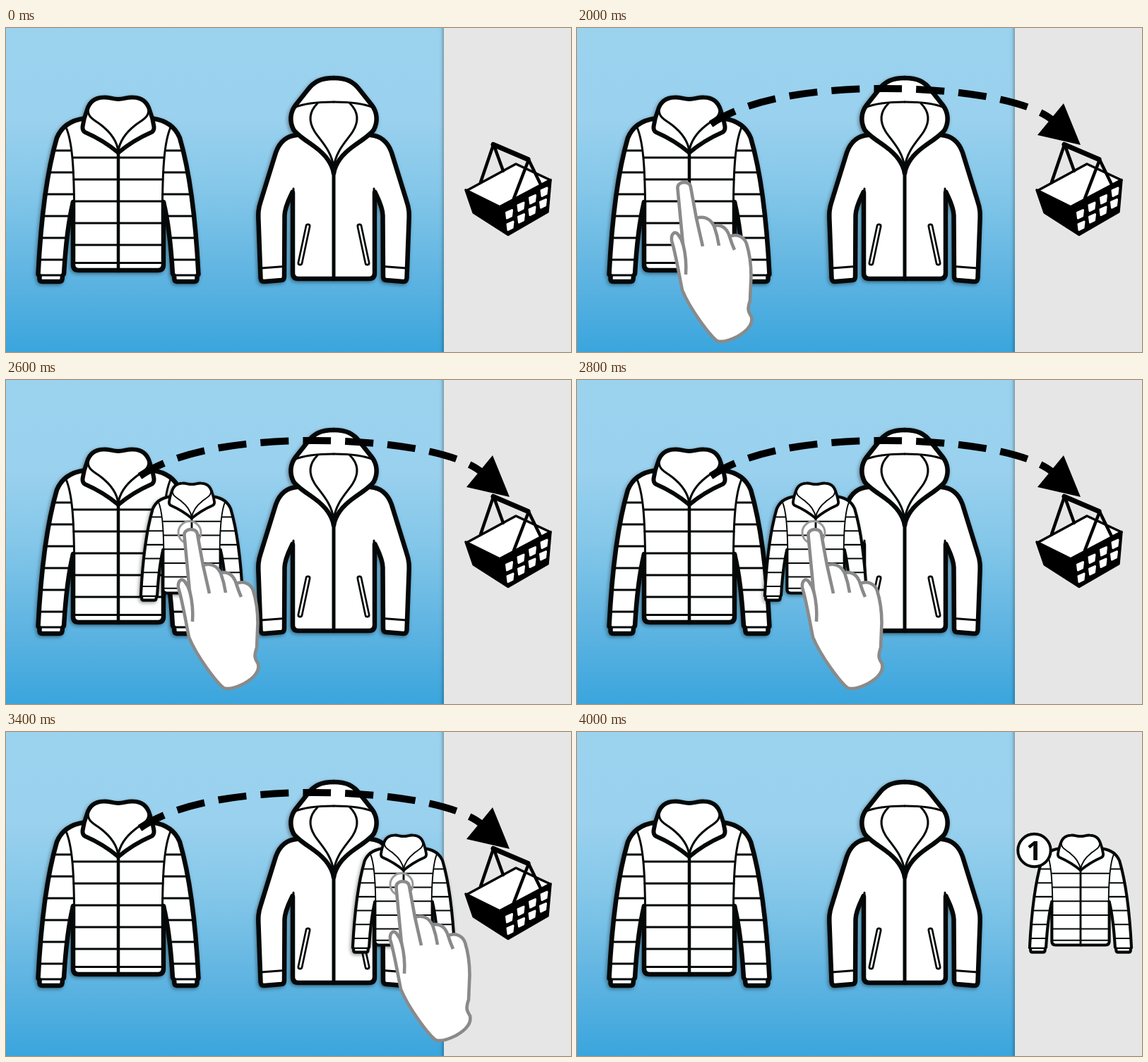
Recreate the animation shown at these times as an HTML page with a canvas. Size 800 px wide and 460 px high, loop 6 s.

```html
<!DOCTYPE html>
<html lang="en">
<head>
<meta charset="utf-8">
<title>Drag to basket</title>
<style>
  html, body { margin: 0; width: 100%; height: 100%; overflow: hidden; background: #e6e6e6; }
  canvas { display: block; width: 100%; height: 100%; }
</style>
</head>
<body>
<canvas id="stage" width="800" height="460"></canvas>
<script>
const W = 800, H = 460, LOOP = 6000, STEP = 100;
const INK = '#050808', GREY = '#8a8a8a';
const canvas = document.getElementById('stage');
const ctx = canvas.getContext('2d');
const layer = document.createElement('canvas');
layer.width = W;
layer.height = H;
const lctx = layer.getContext('2d');

const path = d => new Path2D(d);

// Garments are described by their left half only.
const pufferSleeve = 'M110 128.5C93 131 79 139 72 156C62 190 50.5 250 45.5 350L47.5 352V357Q48 360 51 360H76Q79 360 79.5 357L80 352L82 349C84 315 87 280 95 247';
const pufferCollar = '159 101C150 101 147 98 138 98.5C123 99 117 108 114.5 117C111 126 109.5 133 108.5 140Q108 146 112 148C128 155 146 166 159 177';
const puffer = {
  axis: 159,
  fills: [
    path(pufferSleeve + 'L100 140Z'),
    path('M161 344H103Q95 344 95 336V245L85 142L110 129L161 120Z')
  ],
  lines: [
    [6.5, path(pufferSleeve)],
    [6.5, path('M159 344H103Q95 344 95 336V248')],
    [3, path('M85 141C94 162 96 200 96.5 247')],
    [3.2, path('M68 174H91M62 205H95M55 236H96M51 267H90M49 298H86M46 329H84M46 351H81')],
    [3.2, path('M95 184H159M96 215H159M96 246H159M95 277H159M95 308H159M95 333.5H159')]
  ],
  topFill: path('M161 101H' + pufferCollar + 'H161Z'),
  topLines: [
    [6, path('M' + pufferCollar)],
    [3, path('M117 110C113 126 123 129 135 138C149 149 157 160 159 175')]
  ],
  zip: [4.5, 177, 344]
};
puffer.topFill = path('M161 101L' + pufferCollar + 'H161Z');

const hoodieSleeve = 'M412 152C398 153 388 160 382 177L361 245C357 257 357 263 357.5 274L360.5 355Q361 360.5 366 360L390 358Q394 357.5 394 353L394.5 266C395 253 401 243 405.5 233';
const hood = '464 71C446 71 436 76 427 88L410 109.5C402 120 401.5 133 407 144C412 152 424 159 437 168.5C450 178 461 190 464 206';
const pocket = path('M427.5 281.5L416.5 333.5');
const hoodie = {
  axis: 464,
  fills: [
    path(hoodieSleeve + 'L420 150Z'),
    path('M466 356H414Q406 356 406 348V228L398 160L466 130Z')
  ],
  lines: [
    [6.5, path(hoodieSleeve)],
    [6.5, path('M464 356H414Q406 356 406 348V234')],
    [3, path('M407 228V240')],
    [3, path('M361 341L394 338.5')],
    [8, pocket]
  ],
  slit: pocket,
  topFill: path('M466 71L' + hood + 'H466Z'),
  topLines: [
    [6.5, path('M' + hood)],
    [3, path('M408 113C422 107 442 105 464 105')],
    [3, path('M441 107C428 120 429 134 437 147C446 161 461 174 464 198')]
  ],
  zip: [5, 196, 356]
};

const arrowPath = path('M189.5 136.5C252 94 360 86 436 86C530 86 640 100 676 133');
const arrowHead = path('M713 166L689 107L652 152Z');
const handShape = path('M177.5 221C176 210 195 209 196 219L204 263C213 260 223 262 229 274C238 271 247 276 251 289' +
  'C260 285 271 288 275 299C280 315 281.5 330 281.5 345L280 380C276 392 277 395 282 403C284 412 278 422 262 431' +
  'C250 437 240 440 233 437C222 428 195 392 184 365C179 340 174 310 169 295C168 284 174 281 178 286Q183 292 185 300Z');
const handLines = path('M185 299C189 315 190 330 189 343M204 263L213 303M229 274Q234 288 236 302M251 289Q254 299 258 308');

function stroke(c, shape, width, color = INK) {
  c.lineWidth = width;
  c.strokeStyle = color;
  c.stroke(shape);
}

function fill(c, shape, color = '#fff') {
  c.fillStyle = color;
  c.fill(shape);
}

function bothSides(c, axis, draw) {
  draw();
  c.save();
  c.transform(-1, 0, 0, 1, 2 * axis, 0);
  draw();
  c.restore();
}

function garment(c, g) {
  c.lineCap = c.lineJoin = 'round';
  const strokes = list => list.forEach(([w, p]) => stroke(c, p, w));
  bothSides(c, g.axis, () => g.fills.forEach(p => fill(c, p)));
  bothSides(c, g.axis, () => {
    strokes(g.lines);
    if (g.slit) stroke(c, g.slit, 2.6, '#fff');
  });
  bothSides(c, g.axis, () => fill(c, g.topFill));
  bothSides(c, g.axis, () => strokes(g.topLines));
  const [width, top, bottom] = g.zip;
  c.fillStyle = INK;
  c.fillRect(g.axis - width / 2, top, width, bottom - top);
}

function withShadow(draw) {
  lctx.clearRect(0, 0, W, H);
  lctx.save();
  draw(lctx);
  lctx.restore();
  ctx.save();
  ctx.shadowColor = 'rgba(0,0,0,.4)';
  ctx.shadowBlur = 5;
  ctx.shadowOffsetX = -1.5;
  ctx.shadowOffsetY = 2;
  ctx.drawImage(layer, 0, 0);
  ctx.restore();
}

function smallJacket(c, x) {
  const s = 0.635;
  c.save();
  c.translate(x - puffer.axis * s, 84);
  c.scale(s, s);
  garment(c, puffer);
  c.restore();
}

const sky = ctx.createLinearGradient(0, 0, 0, H);
[[0, '#9bd2ee'], [0.28, '#9ad1ee'], [0.5, '#84c7e9'], [0.75, '#61b5e2'], [1, '#3aa5dd']]
  .forEach(([at, color]) => sky.addColorStop(at, color));

function background() {
  ctx.fillStyle = sky;
  ctx.fillRect(0, 0, W, H);
  ctx.save();
  ctx.shadowColor = 'rgba(0,0,0,.4)';
  ctx.shadowBlur = 5;
  ctx.shadowOffsetX = -1;
  ctx.fillStyle = '#e6e6e6';
  ctx.fillRect(620, -20, 220, H + 40);
  ctx.restore();
}

function basket() {
  ctx.lineCap = ctx.lineJoin = 'round';
  const top = path('M652 231L722 193L771 216L699 254Z');
  fill(ctx, top);
  stroke(ctx, top, 3.5, '#000');
  const sides = path('M651 230L699 254L771 215.5L767 261L711 293.5L662 262Z');
  fill(ctx, sides, '#000');
  stroke(ctx, sides, 3.5, '#000');
  for (let row = 0; row < 2; row++) {
    for (let i = 0; i < 4; i++) {
      const x = 712.5 + row * 1.5 + i * (16.5 - row);
      const y = 264.5 + row * 16.5 - i * 10.5;
      const cell = path(`M${x - 4} ${y - 2.5}L${x + 4} ${y - 6}L${x + 3} ${y + 2.5}L${x - 3} ${y + 5.5}Z`);
      fill(ctx, cell);
      stroke(ctx, cell, 3, '#fff');
    }
  }
  stroke(ctx, path('M690 166L672 219M691 167L704 203M740 187L719 242M740 187L757 222'), 4.5, '#000');
  stroke(ctx, path('M690 165.5L739 186.5'), 7, '#000');
}

function arrow() {
  ctx.save();
  ctx.lineCap = 'butt';
  ctx.setLineDash([40, 20]);
  ctx.lineDashOffset = 1;
  stroke(ctx, arrowPath, 10, '#000');
  ctx.restore();
  fill(ctx, arrowHead, '#000');
}

function hand(x, y, pressed) {
  ctx.save();
  ctx.translate(x - 188, y);
  ctx.lineCap = ctx.lineJoin = 'round';
  if (pressed) {
    ctx.beginPath();
    ctx.arc(185, 216.5, 16, 0, Math.PI * 2);
    ctx.lineWidth = 3;
    ctx.strokeStyle = '#999';
    ctx.stroke();
  }
  fill(ctx, handShape);
  stroke(ctx, handShape, 4.6, GREY);
  ctx.lineCap = 'butt';
  stroke(ctx, handLines, 4.6, GREY);
  ctx.restore();
}

function badge() {
  ctx.beginPath();
  ctx.arc(647.5, 168, 23.2, 0, Math.PI * 2);
  ctx.fillStyle = '#fff';
  ctx.fill();
  ctx.lineWidth = 4;
  ctx.strokeStyle = INK;
  ctx.stroke();
  ctx.fillStyle = INK;
  ctx.font = 'bold 38px "Open Sans", "Noto Sans", sans-serif';
  ctx.textAlign = 'center';
  ctx.fillText('1', 647, 182);
}

function render(t) {
  const step = Math.floor(t / STEP);
  const done = step >= 40;
  background();
  withShadow(c => {
    garment(c, puffer);
    garment(c, hoodie);
  });
  if (done) {
    smallJacket(ctx, 713);
    badge();
    return;
  }
  basket();
  if (step >= 10) arrow();
  if (step < 20) return;
  // The drag holds for two steps, then advances evenly to the basket.
  const x = 150.5 + 37.5 * Math.min(15, Math.max(0, step - 23));
  if (step >= 22) withShadow(c => smallJacket(c, x));
  if (step === 20) hand(x + 2.5, 7, false);
  else hand(x, 0, step < 39);
}

const start = performance.now();
function tick() {
  render((performance.now() - start) % LOOP);
  requestAnimationFrame(tick);
}
tick();
</script>
</body>
</html>
```
